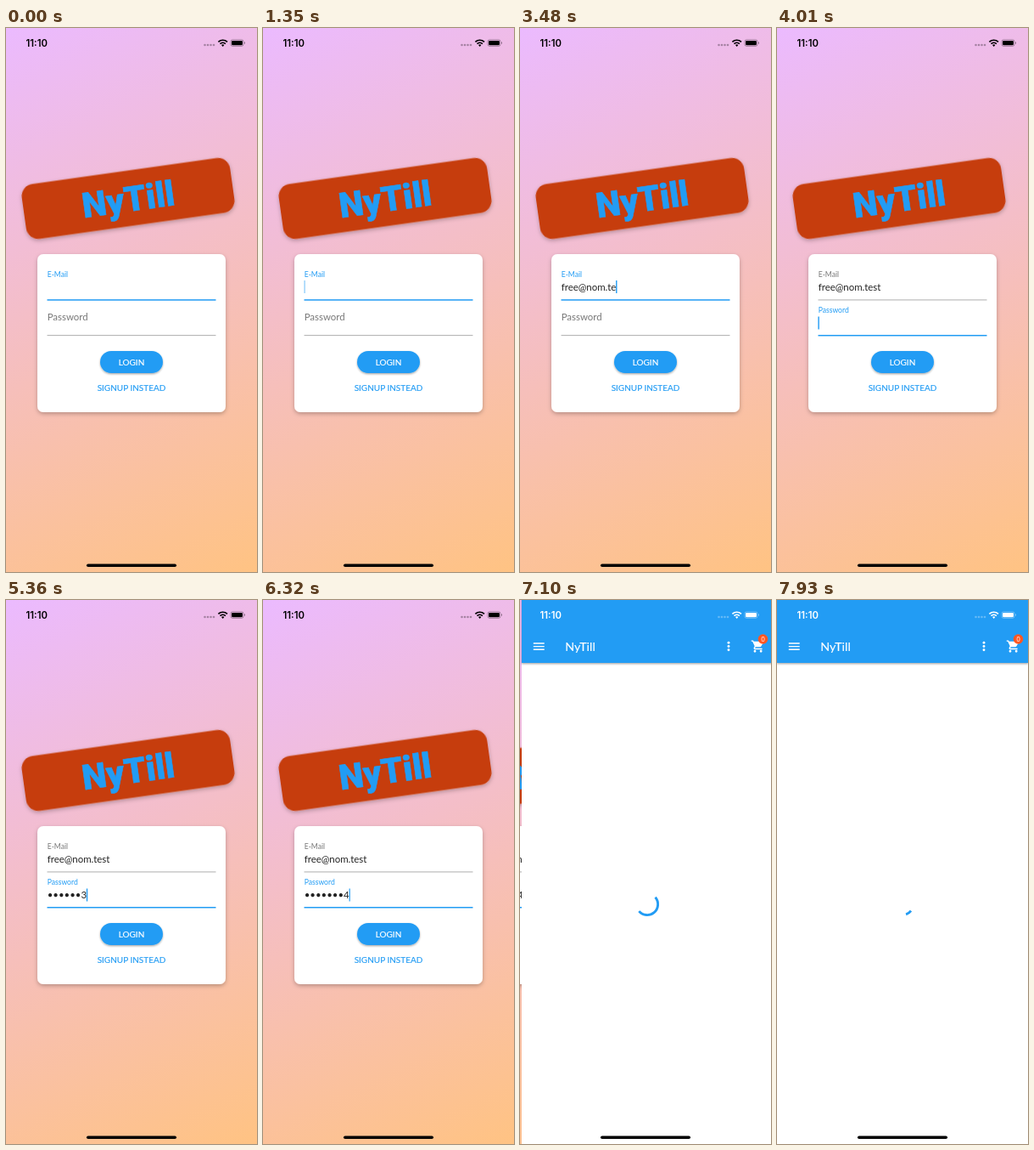
These frames come from a looping animation (296x640 px, 8 s). An HTML page:

```html
<!DOCTYPE html>
<html lang="en">
<head>
<meta charset="utf-8">
<title>Shop login</title>
<style>
  html, body { margin: 0; width: 100%; height: 100%; overflow: hidden; background: #fff; }
  svg { display: block; width: 296px; height: 640px; }
  text { font-family: Lato, "Open Sans", sans-serif; white-space: pre; }
  .value { font-size: 11.44px; fill: #222; }
  .caption { font-size: 10px; text-anchor: middle; }
  .logo { font: 900 41px Roboto, sans-serif; text-anchor: middle; stroke-width: .6; }
  .clock { font: 600 11.3px Inter, sans-serif; }
</style>
</head>
<body>
<svg viewBox="0 0 296 640">
  <defs>
    <linearGradient id="sky" gradientUnits="userSpaceOnUse" x1="0" y1="0" x2="296" y2="640">
      <stop stop-color="#ebbaff"/><stop offset="1" stop-color="#ffc383"/>
    </linearGradient>
    <filter id="soft" x="-20%" y="-20%" width="140%" height="150%">
      <feDropShadow dx="0" dy="2" stdDeviation="2.6" flood-opacity=".26"/>
    </filter>
    <filter id="low" x="-20%" y="-30%" width="140%" height="180%">
      <feDropShadow dx="0" dy="1.2" stdDeviation="1.1" flood-opacity=".35"/>
    </filter>
  </defs>

  <g id="login">
    <rect width="296" height="640" fill="url(#sky)"/>
    <g transform="translate(144 200.5) rotate(-8)">
      <rect x="-124" y="-32.4" width="248" height="64.8" rx="14.3" fill="#c63c09" filter="url(#soft)"/>
      <text class="logo" y="15.5" fill="#229cf4" stroke="#229cf4">NyTill</text>
    </g>
    <rect x="37" y="266" width="222" height="186" rx="7" fill="#fff" filter="url(#soft)"/>

    <text x="48.7" y="293" font-size="8.58" id="emailLabel">E-Mail</text>
    <text x="48.7" y="309" class="value" id="email"></text>
    <rect x="48.5" width="199" id="emailLine"/>

    <text x="48.7" id="passLabel">Password</text>
    <text x="48.7" y="351" class="value" id="pass"></text>
    <rect x="48.5" width="199" id="passLine"/>

    <rect width="1.4" height="15" fill="#229cf4" id="cursor"/>

    <rect x="111" y="380" width="74" height="26" rx="13" fill="#229cf4" filter="url(#low)"/>
    <text class="caption" x="148" y="397" fill="#fff" stroke="#fff" stroke-width=".2">LOGIN</text>
    <text class="caption" x="148" y="427" fill="#229cf4" stroke="#229cf4" stroke-width=".15">SIGNUP INSTEAD</text>
  </g>

  <g id="shop">
    <rect width="296" height="640" fill="#fff"/>
    <rect x="0" y="-10" width="296" height="84" fill="#229cf4" filter="url(#low)"/>
    <path d="M13.8 51h12.9M13.8 54.6h12.9M13.8 58.2h12.9" stroke="#fff" stroke-width="1.4"/>
    <text x="51.3" y="60" font-size="14.3" fill="#fff" stroke="#fff" stroke-width=".15">NyTill</text>
    <g fill="#fff">
      <circle cx="244" cy="50.2" r="1.45"/><circle cx="244" cy="54.5" r="1.45"/><circle cx="244" cy="58.8" r="1.45"/>
      <path transform="translate(270 46) scale(.715)" d="M7 18c-1.1 0-1.99.9-1.99 2S5.9 22 7 22s2-.9 2-2-.9-2-2-2zM1 2v2h2l3.6 7.59-1.35 2.45c-.16.28-.25.61-.25.96 0 1.1.9 2 2 2h12v-2H7.42c-.14 0-.25-.11-.25-.25l.03-.12.9-1.63h7.45c.75 0 1.41-.41 1.75-1.03l3.58-6.49A1 1 0 0 0 20 4H5.21l-.94-2zM17 18a2 2 0 1 0 0 4 2 2 0 0 0 0-4z"/>
    </g>
    <circle cx="284.5" cy="46" r="5.8" fill="#ff5722"/>
    <text x="284.5" y="48.6" font-size="7.2" text-anchor="middle" fill="#fff">0</text>
    <path id="spinner" fill="none" stroke="#229cf4" stroke-width="2.9"/>
  </g>

  <g id="status">
    <text class="clock" x="23.5" y="21.8">11:10</text>
    <g opacity=".3">
      <circle cx="234.5" cy="20" r="1.3"/><circle cx="238" cy="20" r="1.3"/>
      <circle cx="241.5" cy="20" r="1.3"/><circle cx="245" cy="20" r="1.3"/>
    </g>
    <g fill="none" stroke="currentColor" stroke-width="1.7">
      <path d="M250.4 16.4a7.6 7.6 0 0 1 10.6 0M252.5 18.7a4.6 4.6 0 0 1 6.4 0"/>
    </g>
    <path d="M255.7 22l-1.7-1.9a2.5 2.5 0 0 1 3.4 0z"/>
    <rect x="265" y="13.8" width="15" height="7.6" rx="2.2" fill="none" stroke="currentColor" stroke-width=".7" stroke-opacity=".45"/>
    <rect x="266.1" y="14.9" width="12.8" height="5.4" rx="1.2"/>
    <path d="M281 16.3a1.4 1.4 0 0 1 0 2.6z" opacity=".5"/>
  </g>
  <rect x="95" y="630.4" width="106" height="3.6" rx="1.8"/>
</svg>

<script>
const LOOP = 8000, FOCUS_PASS = 3790, ENTER_SHOP = 7100;
const BLUE = '#229cf4', GREY = '#777';
const EMAIL = 'free@nom.test', PASSWORD = 'test1234';

// [time, characters typed]
const emailKeys = [[1760, 1], [1870, 2], [2090, 3], [2190, 4], [2490, 5], [2750, 6],
  [2870, 7], [3060, 8], [3160, 9], [3480, 11], [3650, 13]];
const passKeys = [[4500, 1], [4600, 2], [4850, 4], [4980, 5], [5120, 6], [5360, 7], [6030, 8]];
// [time, cursor opacity]
const blinkKeys = [[0, 0], [200, 0], [440, 1], [720, 1], [1060, 0], [1250, 0], [1460, 1],
  [4180, 1], [4300, 0], [4490, 0], [4500, 1], [6300, 1], [6430, 0], [6560, 0], [6800, 1], [LOOP, 1]];

const el = {};
document.querySelectorAll('svg [id]').forEach(node => el[node.id] = node);

const set = (node, attrs) => {
  for (const name in attrs) node.setAttribute(name, attrs[name]);
};
const clamp = x => Math.min(1, Math.max(0, x));
const mix = (a, b, k) => a + (b - a) * k;
const typed = (keys, t) => keys.reduce((n, [at, count]) => t >= at ? count : n, 0);

function track(keys, t) {
  const i = keys.findIndex(key => key[0] > t);
  const [t0, a] = keys[i - 1], [t1, b] = keys[i];
  return mix(a, b, (t - t0) / (t1 - t0));
}

// cubic-bezier(.4, 0, .2, 1)
function ease(x) {
  x = clamp(x);
  let lo = 0, hi = 1, s = .5;
  for (let i = 0; i < 20; i++) {
    s = (lo + hi) / 2;
    const bx = 1.2 * s * (1 - s) ** 2 + .6 * s * s * (1 - s) + s ** 3;
    if (bx < x) lo = s; else hi = s;
  }
  return s * s * (3 - 2 * s);
}

function underline(node, y, active) {
  set(node, active ? { y: y - .8, height: 1.5, fill: BLUE } : { y: y - .4, height: .7, fill: '#8a8a8a' });
}

function drawLogin(t) {
  const onPass = t >= FOCUS_PASS;
  const float = ease((t - FOCUS_PASS) / 200);
  const count = typed(passKeys, t);

  el.email.textContent = EMAIL.slice(0, typed(emailKeys, t));
  el.pass.textContent = count ? '•'.repeat(count - 1) + PASSWORD[count - 1] : '';
  set(el.emailLabel, { fill: onPass ? GREY : BLUE });
  set(el.passLabel, {
    y: mix(344.3, 335, float),
    'font-size': mix(11.44, 8.58, float),
    fill: onPass ? BLUE : GREY
  });
  underline(el.emailLine, 320, !onPass);
  underline(el.passLine, 361.8, onPass);

  const field = onPass ? el.pass : el.email;
  const width = field.textContent ? field.getComputedTextLength() : 0;
  set(el.cursor, { x: 48.4 + width, y: onPass ? 339.5 : 297, opacity: track(blinkKeys, t) });
}

function drawSpinner(t) {
  const run = 285 + (t - ENTER_SHOP) * .94;
  const phase = run / 1333 % 1;
  const head = ease(phase * 2), tail = ease(phase * 2 - 1);
  const start = -90 + tail * 270 + run / 2222 * 360 + phase * 90 + .027 * (t - 7700);
  const sweep = Math.max(1, (head - tail) * 270);
  const point = deg => {
    const a = deg * Math.PI / 180;
    return `${148 + 12.6 * Math.cos(a)} ${358 + 12.6 * Math.sin(a)}`;
  };
  set(el.spinner, { d: `M${point(start)}A12.6 12.6 0 ${sweep > 180 ? 1 : 0} 1 ${point(start + sweep)}` });
}

function draw(t) {
  const inShop = t >= ENTER_SHOP;
  const slide = t < 7210 ? 2 : 0;
  drawLogin(t);
  set(el.login, { transform: `translate(${inShop ? -98 : 0} 0)` });
  set(el.shop, { display: inShop ? 'inline' : 'none', transform: `translate(${slide} 0)` });
  if (inShop) drawSpinner(t);
  const ink = inShop ? '#fff' : '#000';
  set(el.status, { fill: ink, color: ink });
}

const begin = performance.now();
function tick() {
  draw((performance.now() - begin) % LOOP);
  requestAnimationFrame(tick);
}
tick();
</script>
</body>
</html>
```
